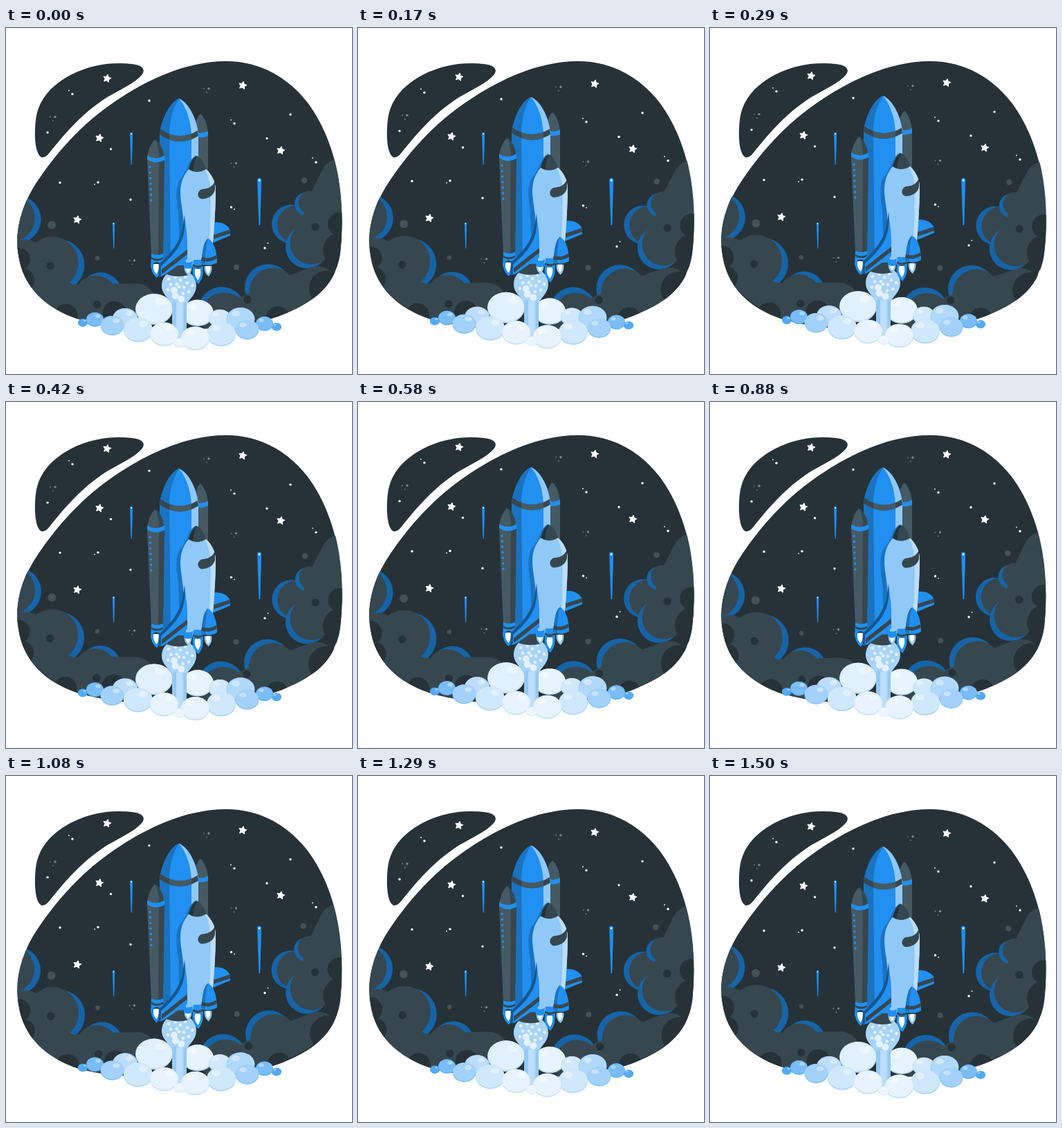
Write an HTML page that moves like this. It is 500 by 500 pixels and loops after 1.54 s.

```html
<!DOCTYPE html>
<html lang="en">
<head>
<meta charset="utf-8">
<title>Rocket launch</title>
<style>
  html, body { margin: 0; width: 100%; height: 100%; overflow: hidden; background: #fff; }
  svg { display: block; width: 100vw; height: 100vh; }
  .night { fill: #263238; }
  .cloud { fill: #37474f; }
  .rim { fill: #1664a8; }
  .steel { fill: #455a64; }
  .blue { fill: #2190f0; }
  .deep { fill: #1a73c0; }
  .navy { fill: #16568f; }
  .pale { fill: #90c8f8; }
  .ice { fill: #bcdefb; }
  .white { fill: #fff; }
  .body, .hole { fill: none; stroke-linecap: round; stroke-linejoin: round; }
  .body { stroke: #37474f; }
  .hole { stroke: #263238; }
</style>
</head>
<body>
<svg viewBox="0 0 500 500">
  <defs>
    <path id="sky" d="M318 48C368 48 408 72 436 108C462 143 475 185 480 215C486 250 487 285 483 325C477 365 455 392 400 414C370 426 330 434 250 436C190 437 150 433 105 421C56 405 24 373 18 328C12 295 22 255 47 219C71 184 101 148 141 118C196 77 258 48 318 48Z"/>
    <clipPath id="skyClip"><use href="#sky"/></clipPath>
    <path id="star" d="M0-5.4L1.6-2L5.2-1.7L2.5.9L3.3 4.5L0 2.6L-3.3 4.5L-2.5.9L-5.2-1.7L-1.6-2Z" fill="#fff" stroke="#fff" stroke-width="1.4" stroke-linejoin="round"/>
    <g id="streak">
      <path class="deep" d="M-3.2 2Q-3-.5 0-.5T3.2 2L1.2 68H-.8Z"/>
      <path class="blue" d="M-2 2Q-1.6 0 0 0T3 2L1.1 68H0Z"/>
      <circle class="white" cy="3" r="1.5"/>
    </g>
    <g id="flame">
      <path d="M-7 0H7C8 10 5 15 1 20C-4 16-8 10-7 0Z"/>
      <path class="white" d="M-3.5 0H3.5C5 7 3 11 .5 15C-3 11-5 7-3.5 0Z"/>
    </g>
  </defs>

  <use href="#sky" class="night"/>
  <path class="night" d="M52 187C43 184 40 160 43 133C47 100 70 80 95 67C125 52 155 49 182 52C199 54 202 61 196 68C187 79 165 89 143 102C110 124 88 149 63 180C59 185 56 187 52 187Z"/>

  <g id="clouds"><g clip-path="url(#skyClip)">
    <g id="lobes"></g>
    <path class="body" stroke-width="62" d="M28 337L40 378L90 402L187 400"/>
    <path class="body" stroke-width="56" d="M482 217L458 265L460 300M450 372L415 385L355 412"/>
    <path class="hole" stroke-width="34" d="M18 335h0M24 365h0M87 416h0M157 412h0M482 283h0M393 419h0"/>
    <path class="hole" stroke-width="52" d="M484 321h0M464 376h0"/>
    <path class="hole" stroke-width="11.4" d="M64 344h0M132 400h0M447 287h0M349 392h0"/>
    <g fill="#435159">
      <circle cx="66" cy="285" r="6"/><circle cx="132" cy="333" r="3.2"/>
      <circle cx="431" cy="220" r="4.2"/><circle cx="333" cy="345.5" r="4"/>
    </g>
  </g></g>
  <g id="stars"></g>
  <use href="#streak" transform="translate(181 151) scale(.68)"/>
  <use href="#streak" transform="translate(366 217)"/>
  <use href="#streak" transform="translate(155.5 281) scale(.55)"/>

  <g id="launch">
    <g id="backPuffs"></g>

    <g id="boosterRight">
      <path class="steel" d="M271 152C272 138 276 128 281 124C286 128 291 138 292 152V212H271Z"/>
      <path class="cloud" d="M271 155H278V212H271Z"/>
      <path class="blue" d="M271 150Q282 154 292 149V156Q282 160 271 157Z"/>
    </g>

    <g id="tank">
      <path class="blue" d="M222 152C226 130 236 108 250 102C264 108 275 130 278 152V346H227Z"/>
      <path class="deep" d="M222 152C226 130 236 108 250 102C240 118 236 136 236 155L238 346H227Z"/>
      <path class="pale" d="M250 102C264 108 275 130 278 152V200H268V155C267 132 260 114 250 102Z"/>
      <path class="deep" d="M275 184C263 190 264 204 252 218C244 230 246 248 249 268L251 322L262 330L278 200Z"/>
      <path class="cloud" d="M223 146Q250 165 277 148L278 156Q250 173 222 154Z"/>
      <path class="steel" d="M236 153Q250 159 268 153V161Q251 167 236 161Z"/>
    </g>

    <g id="boosterLeft">
      <use href="#flame" class="blue" transform="translate(217 341)"/>
      <path class="steel" d="M204 190C205 175 210 165 216 161C222 165 228 175 229 190L227 329H210Z"/>
      <path class="cloud" d="M216 161C222 165 228 175 229 190L227 329H220L221 190Q221 172 216 161Z"/>
      <path class="blue" d="M204 184Q216 192 229 184V191Q216 198 204 190Z"/>
      <path d="M208 201L210 250" fill="none" stroke="#2190f0" stroke-width="3.4" stroke-linecap="round" stroke-dasharray=".1 7.9"/>
      <path class="blue" d="M210 326Q218 330 227 326L228 341Q226 347 224 341Q217 336 212 341L209 348Z"/>
      <path class="cloud" d="M210 331Q218 336 227 331V334Q218 339 210 334Z"/>
    </g>

    <g id="plume">
      <path fill="#a8d4f9" d="M237 353Q250 345 263 353C273 357 277 369 274 379C271 389 263 393 261 401V450H240V401C238 393 229 388 226 379C223 369 227 357 237 353Z"/>
      <path class="ice" d="M246 397H255V450H246Z"/>
      <path class="pale" d="M240 401Q242 394 246 396V450H240ZM257 398L261 396V450H257Z" opacity=".8"/>
      <g id="bubbles" fill="#e5f2fe"></g>
    </g>
    <path class="cloud" d="M228 343H264V357Q246 362 230 355Z"/>

    <g id="orbiter">
      <path class="blue" d="M300 281C313 280 319 284 324 292V300L300 310Z"/>
      <path class="cloud" d="M300 299L324 291V297L300 305Z"/>
      <use href="#flame" class="pale" transform="translate(263 344) scale(.75 .7)"/>
      <use href="#flame" class="pale" transform="translate(292 344) scale(.75)"/>
      <path class="pale" d="M264 204C255 215 252 225 252 240C253 260 259 275 260 341Q279 347 297 338C300 300 303 265 303 234C303 222 297 211 289 204Z"/>
      <path class="ice" d="M289 204C297 211 303 222 303 234C303 265 300 300 297 338L292 340C295 300 297 255 295 228Q293 214 287 204Z"/>
      <path class="cloud" d="M276 185C270 187 266 196 264 204Q276 212 289 204C286 195 282 187 276 185Z"/>
      <path class="night" d="M276 185C270 187 266 196 264 204L270 207Q271 194 276 185Z"/>
      <path class="cloud" d="M302 221C297 232 290 232 283 233C275 236 276 247 284 247C295 246 300 241 302 234Z"/>
      <path class="blue" d="M258 270C258 298 250 315 222 341L221 359Q228 359 234 353L262 334V310C262 295 259 285 258 270Z"/>
      <path class="navy" d="M258 270C255 300 249 316 221 341L220 359L224 358V344C252 320 261 302 258 270Z"/>
      <path class="cloud" d="M225 349L262 320V327L225 356Z"/>
      <path class="blue" d="M257 337Q263 341 270 337L269 346Q263 350 257 346Z"/>
      <use href="#flame" class="blue" transform="translate(277 348) scale(1.05 1.1)"/>
      <path class="blue" d="M271 335H284L285 350Q277 344 270 350Z"/>
      <path class="cloud" d="M270 341Q277 346 285 341V344Q277 349 270 344Z"/>
      <path class="blue" d="M292 304C285 309 284 323 282 340Q293 346 305 339C305 323 301 309 292 304Z"/>
      <path class="deep" d="M292 304C285 309 284 323 282 340L288 342Q287 320 292 304Z"/>
      <path class="cloud" d="M283 331Q294 335 304 328L305 333Q294 340 282 336Z"/>
    </g>

    <g id="frontPuffs"></g>
  </g>
</svg>
<script>
const byId = id => document.getElementById(id);
const fill = (id, parts) => { byId(id).innerHTML = parts.join(''); };
const disc = (x, y, r, attrs = '') => `<circle cx="${x}" cy="${y}" r="${r}" ${attrs}/>`;
const ellipse = (x, y, rx, ry, attrs) =>
  `<ellipse cx="${x}" cy="${y}" rx="${rx}" ry="${ry}" ${attrs}/>`;

// A grey disc shifted over a blue one leaves a crescent rim; angle in degrees
function lobe([x, y, r, angle]) {
  const a = angle * Math.PI / 180, shift = 3.5 + r * 0.16;
  return disc(x, y, r, 'class="rim"') +
    disc(x + shift * Math.cos(a), y + shift * Math.sin(a), r, 'class="cloud"');
}
fill('lobes', [
  [16, 277, 34.5, 192], [137, 384, 30.5, 148], [76, 343, 37.5, 202],
  [412, 283, 28, 5], [435, 316, 31, -40], [434, 254, 17, -23],
  [379, 375, 34, 38], [312, 408, 34, 65]
].map(lobe));

// Bright dots may have a faint companion at the given height difference
const bigStars = [[146, 73], [342, 83], [135, 159], [397, 177], [103, 277]];
const dots = [
  [207, 105], [411, 125], [60, 151], [151.5, 175], [377, 159.5], [78, 223.5], [180, 248],
  [96, 95.5, -5], [330, 138, -5], [448, 194, -6], [133, 223, 3], [325.5, 259, 3], [374, 318, -7]
];
const trios = [[71, 128.5], [293, 87.5], [332.5, 195.5], [185.5, 336]];
const white = 'class="white"', dim = 'fill="#78868c"';

fill('stars', [
  ...bigStars.map(([x, y]) => `<use href="#star" transform="translate(${x} ${y}) rotate(12)"/>`),
  ...dots.map(([x, y, dy]) => disc(x, y, 1.7, white) +
    (dy ? disc(x + (y > 240 ? 4.5 : -5), y + dy, 0.9, white) : '')),
  ...trios.map(([x, y]) =>
    disc(x, y, 1.7, dim) + disc(x - 7, y, 0.9, dim) + disc(x - 3, y + 5.5, 0.9, dim))
]);

// Puffs pale towards the plume and catch its light on the near side
const CENTER = 251;
function puff(x, y, r) {
  const d = x - CENTER, ry = r * 0.83;
  const tone = shade => `fill="hsl(208 88% ${96 - d * d * 0.0016 - shade}%)"`;
  return ellipse(x, y, r, ry, tone(8)) +
    ellipse(x, y - ry * 0.05, r * 0.98, ry * 0.95, tone(0)) +
    ellipse(x - Math.sign(d) * r * 0.35, y - ry * 0.5, r * 0.3, ry * 0.25, 'fill="#fff" opacity=".4"');
}
const pair = (d, y, r) => [-1, 1].map(side => puff(CENTER + side * d, y + 3 * side, r)).join('');

fill('backPuffs', [
  pair(140, 429, 7), pair(122.5, 424.5, 12.5),
  puff(172, 420, 18), puff(277, 412, 23), puff(214, 406.5, 27), puff(309, 420, 16), puff(339, 421, 20.5)
]);
fill('frontPuffs', [
  ...[3, 2, 1].map(i => pair(37.5 * i - 15, 452 - 6.3 * i, 21.5 - 2.3 * (i - 1.6) ** 2)),
  puff(CENTER, 455, 8)
]);

// Sunflower spread inside the smoke ball, every fifth bubble large
fill('bubbles', Array.from({ length: 16 }, (_, i) => {
  const a = i * 2.4 + 1.6, r = 5 * Math.sqrt(i);
  return disc(250 + r * Math.cos(a), 374 + r * Math.sin(a), i % 5 == 3 ? 5 : 2.3);
}));

const PERIOD = 1500, LOOP = 1540, LEAD = LOOP - PERIOD;
const triangle = p => 1 - Math.abs(1 - 2 * (p % 1));

function draw(now) {
  const p = (now % LOOP + LEAD) / PERIOD;
  const lift = `translate(0 ${0.5 - 10 * triangle(p)})`;
  byId('launch').setAttribute('transform', lift);
  byId('stars').setAttribute('transform', lift);
  byId('clouds').setAttribute('transform', `rotate(${2 * triangle(p + 0.25) - 1} ${CENTER} 307)`);
}

const start = performance.now();
(function tick() {
  draw(performance.now() - start);
  requestAnimationFrame(tick);
})();
</script>
</body>
</html>
```
